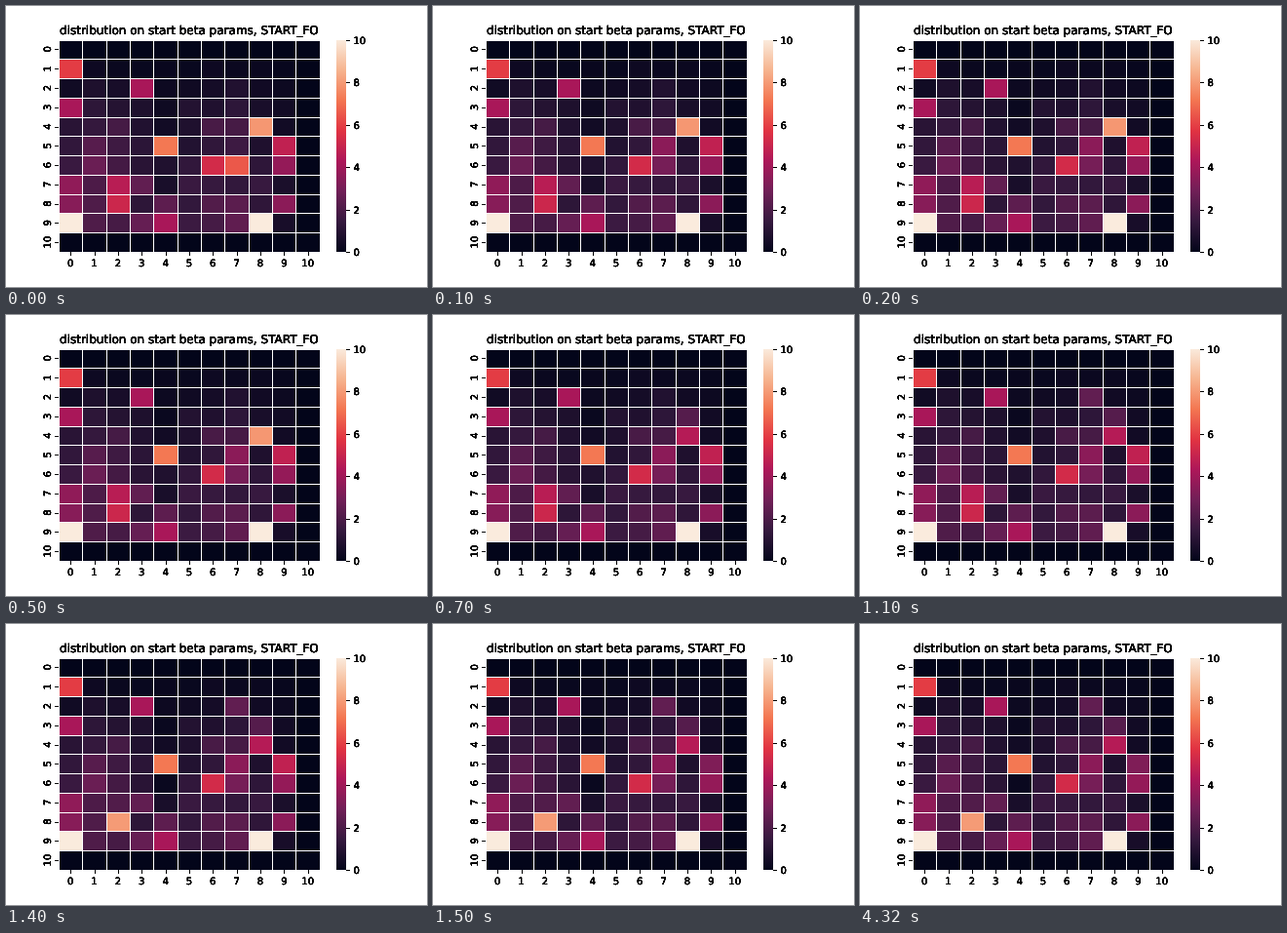
Animation of 432x288 px, one loop 6.2 s. Source, as an HTML page with a canvas:

```html
<!DOCTYPE html>
<html lang="en">
<head>
<meta charset="utf-8">
<title>Heatmap</title>
<style>
  html, body { margin: 0; width: 100%; height: 100%; overflow: hidden; background: #fff; }
  canvas { display: block; }
</style>
</head>
<body>
<canvas id="stage" width="432" height="288"></canvas>
<script>
const ctx = document.getElementById('stage').getContext('2d');
const LOOP = 6200, CELLS = 11, MAX = 10;
const LEFT = 54, RIGHT = 321.84, TOP = 34.56, BOTTOM = 252;
const FONT = '"DejaVu Sans", sans-serif';

// Evenly spaced colours from 0 to MAX
const ramp = ['#03051a', '#35193e', '#701f57', '#ad1759', '#e13342', '#f37651', '#f6b48f', '#faebdd'];

// Cells that stand out, as [row, column, value], and the moment they are set
const steps = [
  { at: 0, cells: [
    [9, 0, 10], [9, 8, 10], [4, 8, 7.9], [5, 4, 7.2], [6, 7, 6.5], [1, 0, 5.9],
    [6, 6, 5.3], [8, 2, 5.1], [5, 9, 4.8], [7, 2, 4.6], [2, 3, 4.2], [3, 0, 4.2],
    [9, 4, 4.2], [6, 9, 3.7], [7, 0, 3.6], [8, 9, 3.5], [8, 0, 3.4],
    [6, 1, 2.7], [9, 3, 2.6], [7, 3, 2.5], [8, 4, 2.4]
  ] },
  { at: 100, cells: [[5, 7, 3.5], [6, 7, 3]] },
  { at: 200, cells: [[3, 4, .2]] },
  { at: 700, cells: [[3, 8, 2.2], [4, 8, 4.5]] },
  { at: 1100, cells: [[2, 7, 2.5]] },
  { at: 1400, cells: [[6, 4, .2], [7, 2, 2.1], [8, 2, 8]] },
  { at: 1500, cells: [[5, 9, 3.2]] }
];

const channels = hex => [1, 3, 5].map(i => parseInt(hex.slice(i, i + 2), 16));

function colour(value) {
  const p = value / MAX * (ramp.length - 1);
  const i = Math.min(Math.floor(p), ramp.length - 2);
  const from = channels(ramp[i]), to = channels(ramp[i + 1]);
  return `rgb(${from.map((v, j) => Math.round(v + (to[j] - v) * (p - i))).join()})`;
}

function noise(row, col) {
  const n = Math.sin(row * 12.9898 + col * 78.233) * 43758.5453;
  return n - Math.floor(n);
}

// Dim field: grows downwards, with two vertical ridges and an empty border.
function background(row, col) {
  if (row % 10 === 0 || col === 10) return 0;
  const level = 1.25 * (1 - Math.exp(-row * row / 10));
  const ridge = 1 + .55 * Math.cos((col - 1.2) / 5.3 * 2 * Math.PI);
  return level * ridge * (.65 + .7 * noise(row, col)) + .1;
}

const xAt = col => LEFT + (RIGHT - LEFT) * col / CELLS;
const yAt = row => TOP + (BOTTOM - TOP) * row / CELLS;

function rect(fill, x, y, w, h) {
  ctx.fillStyle = fill;
  ctx.fillRect(x, y, w, h);
}

// Repeated passes darken the antialiased edges.
function label(text, x, y, { size = 10, align = 'center', angle = 0 } = {}) {
  ctx.save();
  ctx.translate(x, y);
  ctx.rotate(angle);
  ctx.font = `${size}px ${FONT}`;
  ctx.textRendering = 'geometricPrecision';
  ctx.textAlign = align;
  ctx.fillStyle = '#000';
  for (let pass = 0; pass < 7; pass++) ctx.fillText(text, 0, 0);
  ctx.restore();
}

function drawAxes() {
  label('distribution on start beta params, START_FO', (LEFT + RIGHT) / 2, 29, { size: 12 });
  for (let i = 0; i < CELLS; i++) {
    const x = xAt(i + .5), y = yAt(i + .5);
    rect('#000', Math.round(x), BOTTOM, 1, 4);
    label(i, x, 267);
    rect('#000', 50, Math.round(y), 4, 1);
    label(i, 46, y, { angle: -Math.PI / 2 });
  }
}

function drawColourBar() {
  const gradient = ctx.createLinearGradient(0, BOTTOM, 0, TOP);
  ramp.forEach((hex, i) => gradient.addColorStop(i / (ramp.length - 1), hex));
  const top = Math.round(TOP);
  rect(gradient, 339, top, 10, BOTTOM - top);
  for (let v = 0; v <= MAX; v += 2) {
    const y = BOTTOM - (BOTTOM - TOP) * v / MAX;
    rect('#000', 349, Math.round(y), 4, 1);
    label(v, 356.5, Math.round(y + 4), { align: 'left' });
  }
}

function drawCell(row, col, value) {
  const x = Math.round(xAt(col)) + 1, y = Math.round(yAt(row)) + 1;
  rect(colour(value), x, y, Math.round(xAt(col + 1)) - x, Math.round(yAt(row + 1)) - y);
}

function drawCells(time) {
  for (let row = 0; row < CELLS; row++) {
    for (let col = 0; col < CELLS; col++) drawCell(row, col, background(row, col));
  }
  for (const { at, cells } of steps) {
    if (time >= at) cells.forEach(cell => drawCell(...cell));
  }
}

function frame() {
  const time = performance.now() % LOOP;
  rect('#fff', 0, 0, 432, 288);
  drawAxes();
  drawColourBar();
  drawCells(time);
  requestAnimationFrame(frame);
}
frame();
</script>
</body>
</html>
```
